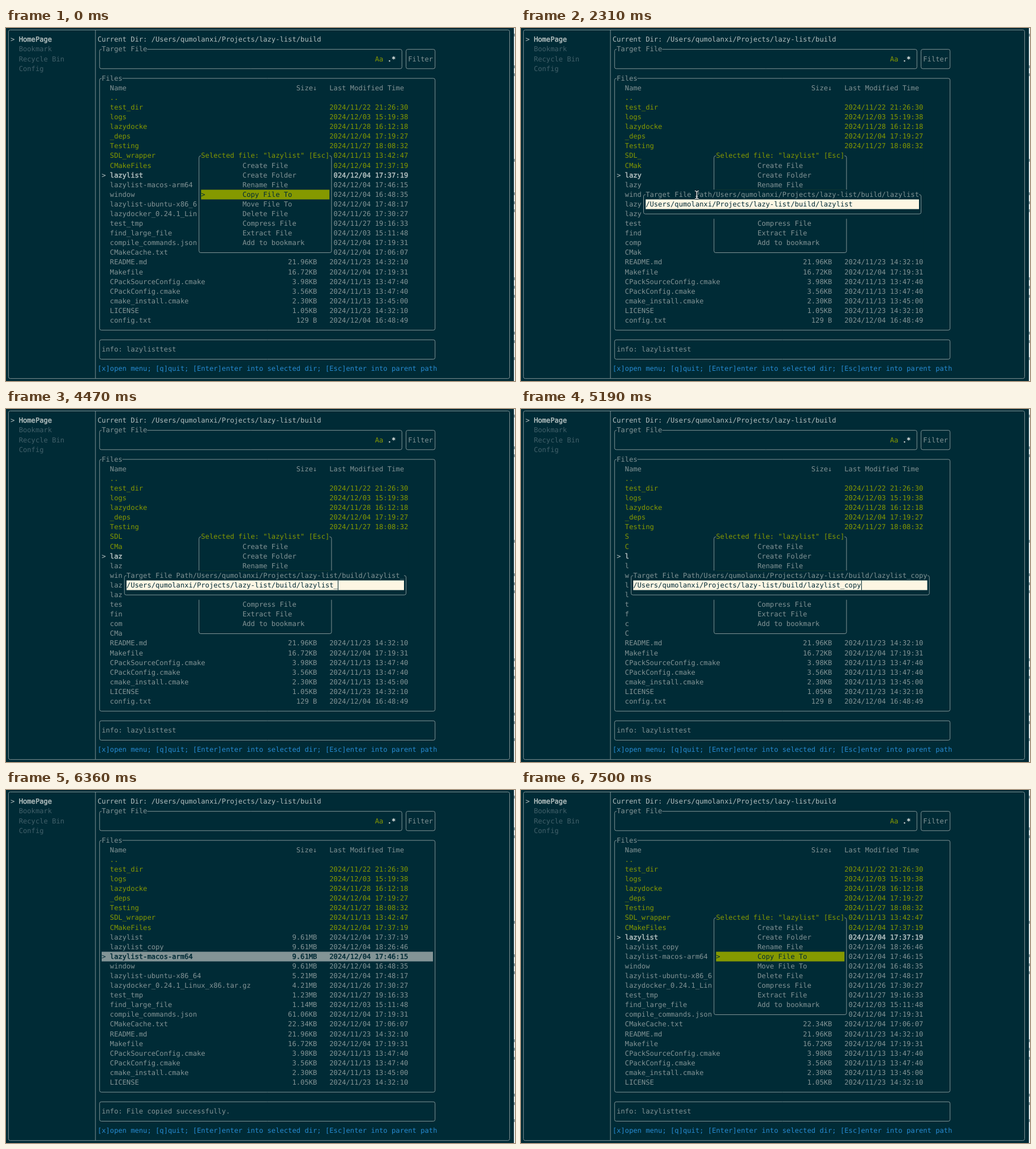
Recreate the animation shown at these times as an HTML page with a canvas. Size 899x623 px, loop 8000 ms.

```html
<!DOCTYPE html>
<html lang="en">
<head>
<meta charset="utf-8">
<title>Terminal file manager</title>
<style>
  html, body { margin: 0; width: 100%; height: 100%; overflow: hidden; background: #002b36; }
  canvas { display: block; width: 899px; height: 623px; }
</style>
</head>
<body>
<canvas id="stage"></canvas>
<script>
const W = 899, H = 623, LOOP = 8000;
const CELL_W = 7.315, CELL_H = 17.09, LEFT = 0.7, TOP = -5.1, BASELINE = 12.4;
const COLOR = {
  bg: '#002b36', text: '#839496', bright: '#b3bfbf', dim: '#41606a',
  green: '#859900', blue: '#268bd2', cream: '#fdf6e3'
};
const FONT = '12.15px "DejaVu Sans Mono", monospace';

const HOME = '/Users/qumolanxi/Projects/lazy-list/build';
const DIRS = `test_dir||11/22 21:26:30
logs||12/03 15:19:38
lazydocke||11/28 16:12:18
_deps||12/04 17:19:27
Testing||11/27 18:08:32
SDL_wrapper||11/13 13:42:47
CMakeFiles||12/04 17:37:19`.split('\n');
const FILES = `lazylist|9.61MB|12/04 17:37:19
lazylist-macos-arm64|9.61MB|12/04 17:46:15
window|9.61MB|12/04 16:48:35
lazylist-ubuntu-x86_64|5.21MB|12/04 17:48:17
lazydocker_0.24.1_Linux_x86.tar.gz|4.21MB|11/26 17:30:27
test_tmp|1.23MB|11/27 19:16:33
find_large_file|1.14MB|12/03 15:11:48
compile_commands.json|61.06KB|12/04 17:19:31
CMakeCache.txt|22.34KB|12/04 17:06:07
README.md|21.96KB|11/23 14:32:10
Makefile|16.72KB|12/04 17:19:31
CPackSourceConfig.cmake|3.98KB|11/13 13:47:40
CPackConfig.cmake|3.56KB|11/13 13:47:40
cmake_install.cmake|2.30KB|11/13 13:45:00
LICENSE|1.05KB|11/23 14:32:10
config.txt|129 B|12/04 16:48:49`.split('\n');
const COPIED = [FILES[0], 'lazylist_copy|9.61MB|12/04 18:26:46', ...FILES.slice(1, 15)];
const MENU = ['Create File', 'Create Folder', 'Rename File', 'Copy File To', 'Move File To',
  'Delete File', 'Compress File', 'Extract File', 'Add to bookmark'];

// Each track lists [start time, value]; a value holds until the next start.
const MODE = [[0, 'menu'], [1680, 'input'], [5580, 'list'], [7470, 'menu']];
const MENU_ROW = [[0, 3], [90, 4], [1080, 5], [1290, 4], [1410, 3]];
const TYPED = [[0, ''], [3270, '_'], [3870, ''], [4470, '_'], [4650, '_c'],
  [5010, '_co'], [5100, '_cop'], [5190, '_copy']];
const FILE_ROW = [[0, 0], [6210, 1], [6360, 2], [6540, 3], [6720, 2], [6900, 1], [7050, 0]];
const at = (track, t) => track.filter(([start]) => start <= t).pop()[1];

const canvas = document.getElementById('stage');
const scale = window.devicePixelRatio || 1;
canvas.width = W * scale;
canvas.height = H * scale;
const ctx = canvas.getContext('2d');
ctx.scale(scale, scale);

const cellX = c => LEFT + c * CELL_W;
const cellY = r => TOP + r * CELL_H;
const midX = c => cellX(c + 0.5);
const midY = r => cellY(r + 0.5);

function fill(col, row, cols, rows, color) {
  ctx.fillStyle = color;
  ctx.fillRect(cellX(col), cellY(row), cols * CELL_W, rows * CELL_H);
}

// Heavy text is the regular face thickened by a thin outline.
function write(str, col, row, color = COLOR.text, heavy = false) {
  ctx.font = FONT;
  ctx.fillStyle = ctx.strokeStyle = color;
  ctx.lineWidth = 0.5;
  [...str].forEach((ch, i) => {
    const x = cellX(col + i), y = cellY(row) + BASELINE;
    ctx.fillText(ch, x, y);
    if (heavy) ctx.strokeText(ch, x, y);
  });
}

function box(c0, r0, c1, r1, title = '', color = COLOR.text) {
  const x = midX(c0), y = midY(r0);
  ctx.strokeStyle = COLOR.text;
  ctx.lineWidth = 1;
  ctx.beginPath();
  ctx.roundRect(x, y, midX(c1) - x, midY(r1) - y, 3);
  ctx.stroke();
  if (title) {
    fill(c0 + 1, r0, title.length, 1, COLOR.bg);
    write(title, c0 + 1, r0, color);
  }
}

function drawFrame() {
  ctx.fillStyle = COLOR.bg;
  ctx.fillRect(0, 0, W, H);

  // Sliver of the window behind
  ctx.fillStyle = '#e6ebeb';
  ctx.fillRect(897, 0, 2, H);
  ctx.fillStyle = '#8a9da1';
  for (const y of [10, 66, 80, 231, 290, 306, 320, 440, 455, 471, 536, 551, 581]) {
    ctx.fillRect(897, y, 2, 5);
  }

  box(0, 0, 121, 36);
  ctx.beginPath();
  ctx.moveTo(midX(21), midY(0));
  ctx.lineTo(midX(21), midY(36));
  ctx.stroke();

  write('>', 1, 1, COLOR.bright);
  write('HomePage', 3, 1, COLOR.bright, true);
  ['Bookmark', 'Recycle Bin', 'Config'].forEach((s, i) => write(s, 3, 2 + i, COLOR.dim));

  write('Current Dir: ' + HOME, 22, 1, COLOR.bright);
  box(22, 2, 95, 4, 'Target File');
  write('Aa', 89, 3, COLOR.green);
  write('.*', 92, 3, '#d5dcda', true);
  box(96, 2, 103, 4);
  write('Filter', 97, 3);
  box(22, 5, 103, 31, 'Files');
  box(22, 32, 103, 34);
  write('[x]open menu; [q]quit; [Enter]enter into selected dir; [Esc]enter into parent path',
    22, 35, COLOR.blue);
}

function drawEntry(entry, row, color, heavy) {
  const [name, size, date] = entry.split('|');
  write(name, 25, row, color, heavy);
  write(size, 75 - size.length, row, color, heavy);
  write('2024/' + date, 78, row, color, heavy);
}

function drawFiles(files, selected, focused) {
  write('Name', 25, 6);
  write('Size↓', 70, 6);
  write('Last Modified Time', 78, 6);
  write('..', 25, 7, COLOR.green);
  DIRS.forEach((d, i) => drawEntry(d, 8 + i, COLOR.green));
  files.forEach((f, i) => {
    const row = 15 + i, on = i === selected;
    if (on && focused) fill(23, row, 80, 1, COLOR.text);
    const color = !on ? COLOR.text : focused ? COLOR.bg : COLOR.bright;
    if (on) write('>', 23, row, color);
    drawEntry(f, row, color, on);
  });
}

function drawMenu(selected) {
  fill(46, 13, 33, 11, COLOR.bg);
  box(46, 13, 78, 23, 'Selected file: "lazylist" [Esc]', COLOR.green);
  MENU.forEach((label, i) => {
    const on = i === selected, row = 14 + i;
    if (on) {
      fill(47, row, 31, 1, COLOR.green);
      write('>', 47, row, COLOR.bg);
    }
    write(label, 57, row, on ? COLOR.bg : COLOR.text);
  });
}

function drawInput(t) {
  const path = HOME + '/lazylist' + at(TYPED, t);
  const title = 'Target File Path' + path;
  const cols = title.length + 2;
  const left = Math.floor((126 - cols) / 2);
  fill(left, 13, cols, 11, COLOR.bg);
  drawMenu(3);
  fill(left, 17, cols, 3, COLOR.bg);
  box(left, 17, left + cols - 1, 19, title);
  fill(left + 1, 18, cols - 2, 1, COLOR.cream);
  write(path, left + 1, 18, COLOR.bg);
  if (t >= 2580) {
    const caret = left + 1 + (t < 3000 ? 0 : path.length);
    ctx.fillStyle = COLOR.bg;
    ctx.fillRect(Math.round(cellX(caret)), cellY(18), 1, CELL_H);
  }
  if (t >= 2310 && t < 2340) drawPointer(310.5, 294.5);
}

function drawPointer(x, y) {
  ctx.beginPath();
  for (const s of [-1, 1]) {
    ctx.moveTo(x - 3.5, y + s * 7);
    ctx.quadraticCurveTo(x, y + s * 7, x, y + s * 4);
    ctx.quadraticCurveTo(x, y + s * 7, x + 3.5, y + s * 7);
  }
  ctx.moveTo(x, y - 5);
  ctx.lineTo(x, y + 5);
  ctx.moveTo(x - 2, y + 2.5);
  ctx.lineTo(x + 2, y + 2.5);
  ctx.strokeStyle = '#10262d';
  ctx.lineWidth = 3;
  ctx.stroke();
  ctx.strokeStyle = '#ffffff';
  ctx.lineWidth = 1.2;
  ctx.stroke();
}

function render(t) {
  const mode = at(MODE, t), copied = t >= 5580;
  ctx.textRendering = 'geometricPrecision';
  drawFrame();
  drawFiles(copied ? COPIED : FILES, at(FILE_ROW, t), mode === 'list');
  write('info: ' + (mode === 'list' ? 'File copied successfully.' : 'lazylisttest'), 23, 33);
  if (mode === 'menu') drawMenu(at(MENU_ROW, t));
  if (mode === 'input') drawInput(t);
}

const start = performance.now();
function tick() {
  render((performance.now() - start) % LOOP);
  requestAnimationFrame(tick);
}
tick();
</script>
</body>
</html>
```
